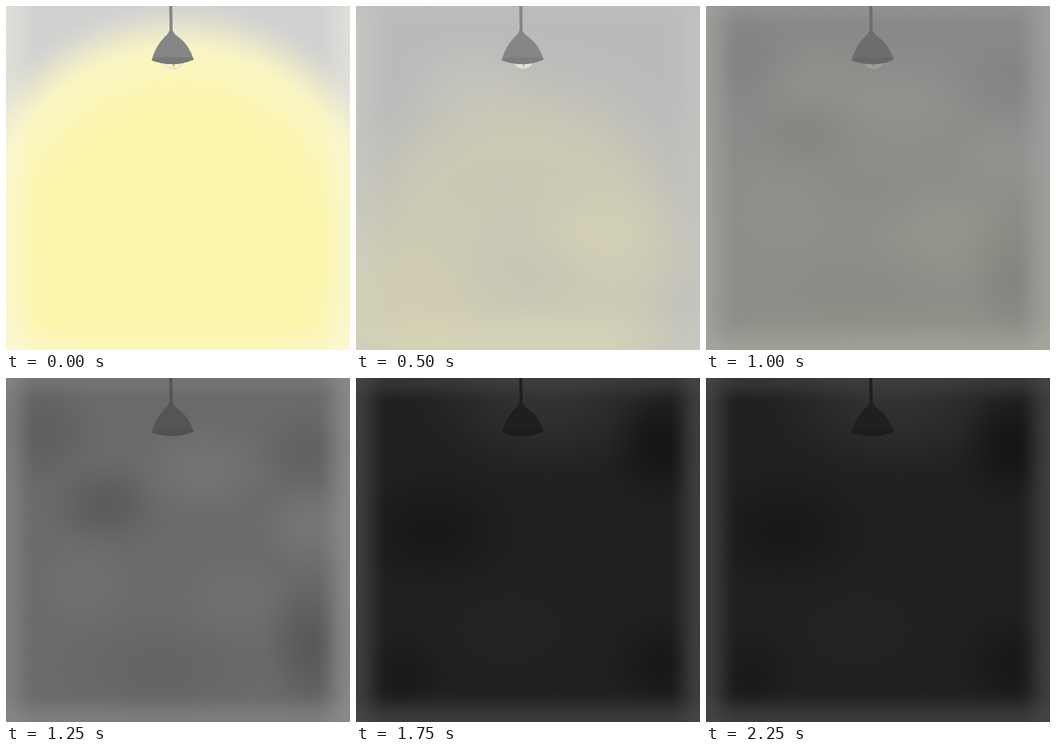
Animation of 450x450 px, one loop 2500 ms. Source, as an HTML page with a canvas:

```html
<!DOCTYPE html>
<html lang="en">
<head>
<meta charset="utf-8">
<title>Lamp going out</title>
<style>
html, body { margin: 0; width: 100%; height: 100%; overflow: hidden; background: #222; }
canvas { display: block; }
</style>
</head>
<body>
<canvas id="stage" width="450" height="450"></canvas>
<script>
const SIZE = 450, STEP = 250;

// glows: [x, y, rx, ry, colour, flat core (0..1)]; edges: [side, width, colour]
const moods = [
  { // fully lit
    wall: '#d1d1d2', shade: '#868686', rim: '#787878', bulb: '#f4f1dc', filament: '#d6b43c',
    glows: [[225, 330, 323, 341, '#faf6c6', .77], [225, 320, 275, 282, '#fbf5ac', .62]],
    edges: [['left', 45, '#fbf9e44d'], ['right', 45, '#fbf9e44d'], ['bottom', 35, '#fbf9e440']]
  },
  { // dimmed
    wall: '#cdcdcd', shade: '#888888', rim: '#7d7d7d', bulb: '#fbf8e6', filament: '#d9c48a',
    glows: [[215, 330, 270, 275, '#e7e3c2', .5], [60, 390, 150, 150, '#efeabc', 0],
            [230, 340, 120, 100, '#dcdac1', 0], [310, 270, 100, 90, '#e8e4c0', 0]],
    edges: [['top', 14, '#c4c4c466'], ['right', 35, '#d2d2d077']]
  },
  { // pale
    wall: '#a9a9aa', shade: '#868686', rim: '#7e7e7e', bulb: '#cfcfcd', filament: '#a9a392',
    glows: [[225, 330, 310, 310, '#b3b2a9', .5], [150, 105, 110, 80, '#b8b7ae', 0],
            [320, 305, 150, 100, '#bcbbab', 0], [200, 235, 150, 70, '#afaea8', 0],
            [250, 450, 300, 90, '#bebda9', 0]],
    edges: [['left', 50, '#c6c6bc99'], ['right', 50, '#bebeb688'],
            ['bottom', 60, '#c8c8b488'], ['top', 25, '#b6b6b666']]
  },
  { // dusk
    wall: '#6a6a6a', shade: '#555555', rim: '#515151',
    glows: [[45, 70, 90, 90, '#5f5f5f', 0], [130, 165, 90, 70, '#5c5c5c', 0],
            [260, 120, 110, 80, '#747474', 0], [395, 95, 80, 70, '#626262', 0],
            [400, 195, 90, 70, '#767676', 0], [100, 270, 90, 80, '#707070', 0],
            [300, 285, 100, 80, '#707070', 0], [400, 350, 75, 110, '#595959', 0],
            [200, 380, 150, 80, '#646464', 0]],
    edges: [['left', 40, '#8a8a8a99'], ['right', 45, '#949494aa'],
            ['bottom', 40, '#8e8e8e88'], ['top', 30, '#88888855']]
  },
  { // dark
    wall: '#202020', shade: '#1f1f1f', rim: '#1c1c1c',
    glows: [[250, 20, 200, 130, '#323232', 0], [400, 90, 80, 90, '#151515', 0],
            [100, 200, 130, 90, '#181818', 0], [200, 330, 130, 90, '#232323', 0],
            [400, 375, 80, 80, '#181818', 0], [60, 390, 70, 70, '#1a1a1a', 0]],
    edges: [['left', 42, '#484848bb'], ['right', 42, '#484848bb'],
            ['bottom', 42, '#484848aa'], ['top', 35, '#48484888']]
  }
];

// pairs of moods for each step; unequal pairs are mixed half and half
const steps = [[0, 0], [1, 1], [1, 2], [2, 2], [2, 3], [3, 3], [3, 4], [4, 4], [0, 0], [4, 4]];

const smooth = t => t * t * (3 - 2 * t);

function fade(gradient, colour, flat) {
  const rgb = colour.slice(0, 7), alpha = parseInt(colour.slice(7) || 'ff', 16);
  for (let i = 0; i <= 10; i++) {
    const a = Math.round(alpha * (1 - smooth(i / 10)));
    gradient.addColorStop(flat + (1 - flat) * i / 10, rgb + a.toString(16).padStart(2, '0'));
  }
  return gradient;
}

function drawGlow(c, [x, y, rx, ry, colour, flat]) {
  c.save();
  c.translate(x, y);
  c.scale(rx, ry);
  c.fillStyle = fade(c.createRadialGradient(0, 0, 0, 0, 0, 1), colour, flat);
  c.fillRect(-1, -1, 2, 2);
  c.restore();
}

function drawEdge(c, [side, w, colour]) {
  const ends = { left: [0, 0, w, 0], right: [SIZE, 0, SIZE - w, 0],
                 top: [0, 0, 0, w], bottom: [0, SIZE, 0, SIZE - w] };
  c.fillStyle = fade(c.createLinearGradient(...ends[side]), colour, 0);
  c.fillRect(0, 0, SIZE, SIZE);
}

function drawLamp(c, { shade, rim, bulb, filament }) {
  if (bulb) {
    c.fillStyle = bulb;
    c.strokeStyle = '#d4d2c4';
    c.beginPath();
    c.ellipse(219, 73, 12, 9, 0, 0, Math.PI);
    c.fill();
    c.stroke();
    c.fillStyle = filament;
    c.fillRect(218, 74, 2.5, 5);
  }
  c.fillStyle = shade;
  c.fill(new Path2D('M213.5 0H217.5L218 32Q220 37 225 40Q239 50 245.5 70Q232 76 218 76Q203 76 190.5 71Q195 53 208 40Q213 36 214 31Z'));
  c.fillStyle = rim;
  c.fill(new Path2D('M192 69Q206 65 218 67Q234 68 244 67L245.5 70Q232 76 218 76Q203 76 190.5 71Z'));
}

function paint(mood) {
  const canvas = document.createElement('canvas');
  canvas.width = canvas.height = SIZE;
  const c = canvas.getContext('2d');
  c.fillStyle = mood.wall;
  c.fillRect(0, 0, SIZE, SIZE);
  mood.glows.forEach(g => drawGlow(c, g));
  mood.edges.forEach(e => drawEdge(c, e));
  drawLamp(c, mood);
  return canvas;
}

const scenes = moods.map(paint);
const ctx = document.getElementById('stage').getContext('2d');
const start = performance.now();

function render(now) {
  const [a, b] = steps[Math.floor(Math.max(0, now - start) / STEP) % steps.length];
  ctx.globalAlpha = 1;
  ctx.drawImage(scenes[a], 0, 0);
  if (a !== b) {
    ctx.globalAlpha = .5;
    ctx.drawImage(scenes[b], 0, 0);
  }
  requestAnimationFrame(render);
}
render(start);
</script>
</body>
</html>
```
